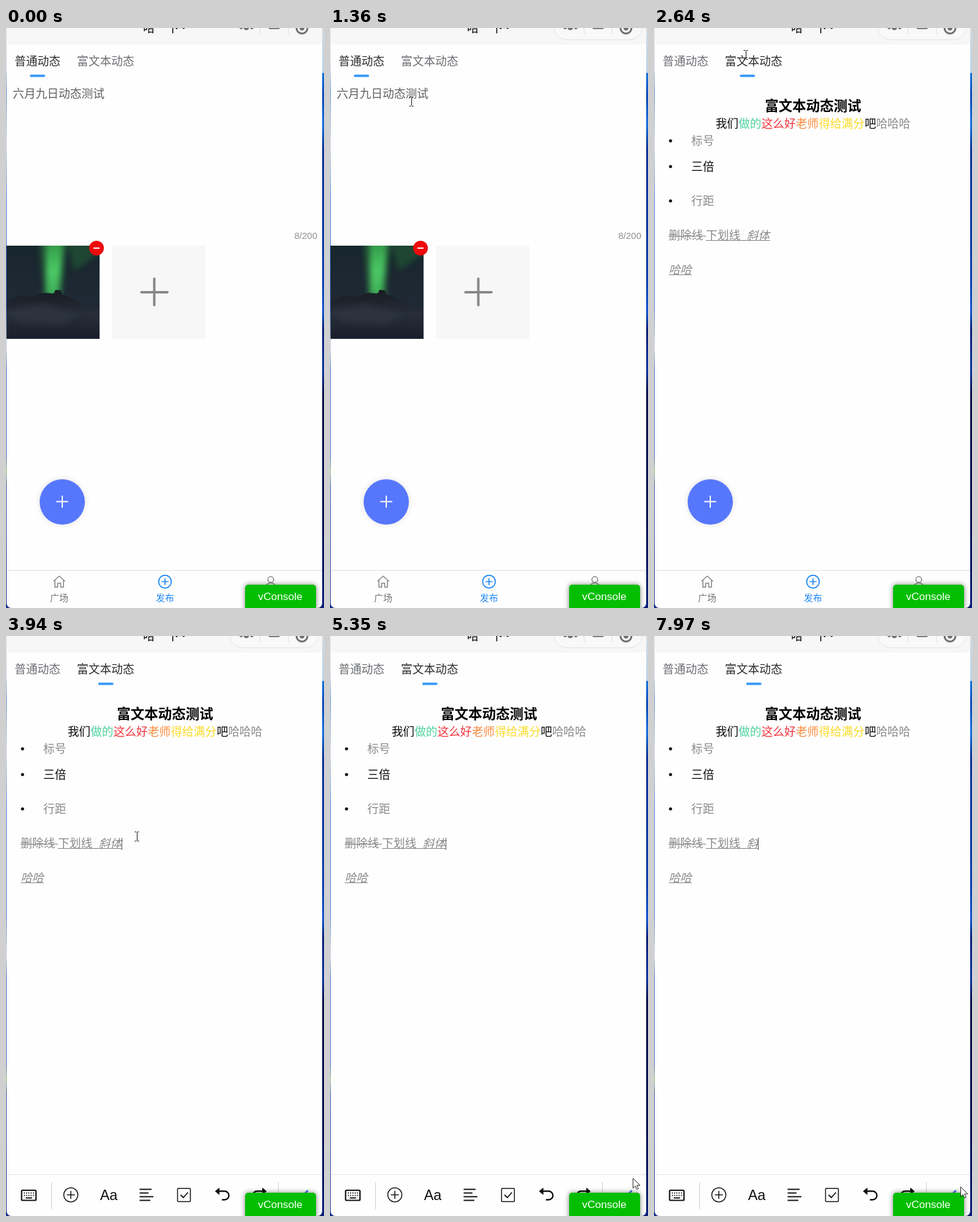
Write an HTML page that moves like this. It is 520 by 946 pixels and loops after 8000 ms.

```html
<!DOCTYPE html>
<html lang="zh">
<head>
<meta charset="utf-8">
<style>
  html, body { margin: 0; width: 100%; height: 100%; overflow: hidden; background: #fff; }
  svg { display: block; width: 520px; height: 946px; }
  text { font: 300 18.75px "Noto Sans CJK SC", "Noto Sans CJK", sans-serif; fill: #606060; white-space: pre; }
  .black { fill: #0a0a0a; }
  .gray { fill: #8a8a8a; }
  .mid { text-anchor: middle; }
  .title { font-size: 22.5px; font-weight: 700; fill: #000; }
  .latin { font-family: "Liberation Sans", Arial, sans-serif; font-weight: 400; }
  .small { font-size: 15px; }
  .slant { font-style: italic; }
  .line { fill: none; stroke-linecap: round; stroke-linejoin: round; }
</style>
</head>
<body>
<svg viewBox="0 0 520 946">
  <defs>
    <linearGradient id="left" x2="0" y2="1">
      <stop offset="0" stop-color="#dcdfe4"/><stop offset=".07" stop-color="#c3d0e4"/>
      <stop offset=".11" stop-color="#4d83cf"/><stop offset=".2" stop-color="#c4ccd8"/>
      <stop offset=".3" stop-color="#2f6fd4"/><stop offset=".48" stop-color="#3b6fd0"/>
      <stop offset=".55" stop-color="#c4ccd8"/><stop offset=".59" stop-color="#3161c4"/>
      <stop offset=".74" stop-color="#3161c4"/><stop offset=".765" stop-color="#9cba6a"/>
      <stop offset=".79" stop-color="#2548a8"/><stop offset="1" stop-color="#162f88"/>
    </linearGradient>
    <linearGradient id="right" x2="0" y2="1">
      <stop offset="0" stop-color="#d3d9e0"/><stop offset=".077" stop-color="#bcd4ea"/>
      <stop offset=".078" stop-color="#1672e0"/><stop offset=".12" stop-color="#0a48b8"/>
      <stop offset=".165" stop-color="#1672e0"/><stop offset=".21" stop-color="#08309c"/>
      <stop offset=".38" stop-color="#0838a8"/><stop offset=".43" stop-color="#0a3cb0"/>
      <stop offset=".49" stop-color="#1254d0"/><stop offset=".52" stop-color="#061c78"/>
      <stop offset=".59" stop-color="#0a34a4"/><stop offset=".63" stop-color="#050f48"/>
      <stop offset=".85" stop-color="#050f50"/><stop offset="1" stop-color="#082078"/>
    </linearGradient>
    <linearGradient id="sky" x2="0" y2="1">
      <stop offset="0" stop-color="#18262d"/><stop offset="1" stop-color="#232b3a"/>
    </linearGradient>
    <linearGradient id="beam" x2="0" y2="1">
      <stop offset="0" stop-color="#2f9443"/><stop offset=".55" stop-color="#4bc865"/>
      <stop offset="1" stop-color="#3fae58"/>
    </linearGradient>
    <linearGradient id="rock" x2="0" y2="1">
      <stop offset="0" stop-color="#171b22"/><stop offset=".5" stop-color="#272e38"/>
      <stop offset="1" stop-color="#191e2a"/>
    </linearGradient>
    <filter id="soft" x="-60%" y="-30%" width="220%" height="160%"><feGaussianBlur stdDeviation="4"/></filter>
    <filter id="shade" x="-20%" y="-40%" width="140%" height="180%"><feGaussianBlur stdDeviation="4"/></filter>
    <clipPath id="photo"><path d="M1 355h152v152H1z"/></clipPath>
  </defs>

  <path fill="url(#left)" d="M0 0h260v946H0z"/>
  <path fill="url(#right)" d="M260 0h260v946H260z"/>
  <path fill="#fefefe" d="M1 0h516v938a8 8 0 0 1-8 8H9a8 8 0 0 1-8-8z"/>

  <!-- header -->
  <path fill="#f7f7f7" d="M1 0h516v27H1z"/>
  <text x="224" y="7" class="black" style="font-size:19.7px;font-weight:400">哈一下~</text>
  <rect id="capsule" x="366" y="-23" width="145" height="42" rx="21" fill="#f9f9f9" stroke="#e2e2e2"/>
  <path stroke="#dcdcdc" d="M415.5 0V10M461.5 0V10"/>
  <g fill="#707070"><circle cx="384.5" cy="-1" r="3"/><circle cx="393" cy="-1" r="4.5"/><circle cx="402" cy="-1" r="3"/></g>
  <path class="line" stroke="#707070" stroke-width="3.5" d="M431 0H446"/>
  <circle cx="484" cy="0" r="9" fill="none" stroke="#707070" stroke-width="3"/><circle cx="484" cy="0" r="4" fill="#707070"/>

  <!-- tabs -->
  <text id="tabA" x="14" y="61">普通动态</text>
  <text id="tabB" x="116" y="61">富文本动态</text>
  <rect id="bar" y="76" width="25" height="4" rx="2" fill="#3f9bfa"/>

  <g id="plain">
    <text x="11" y="114">六月九日动态测试</text>
    <text x="509" y="344" class="latin small" text-anchor="end" style="fill:#909090">8/200</text>
    <g clip-path="url(#photo)">
      <path fill="url(#sky)" d="M1 355h152v152H1z"/>
      <path fill="#245c34" opacity=".6" filter="url(#soft)" d="M98 350H158V364L112 396z"/>
      <path fill="#2b7d40" opacity=".5" filter="url(#soft)" d="M54 345H100L92 440H62z"/>
      <path fill="url(#beam)" filter="url(#soft)" d="M65 345H94L86 436H66z"/>
      <path fill="url(#rock)" d="M1 445L22 437 45 438 62 432 78 433 81 427 90 428 92 434 110 442 130 452 153 458V507H1z"/>
      <path fill="#303743" opacity=".6" filter="url(#soft)" d="M1 462L60 450 120 468 90 484 20 480z"/>
    </g>
    <circle cx="148" cy="359" r="12" fill="#ee0a0a"/>
    <path stroke="#fff" stroke-width="2" d="M143 359H153"/>
    <path fill="#f7f7f7" d="M173 355h153v152H173z"/>
    <path class="line" stroke="#888" stroke-width="4" d="M221.5 431H264M242.5 409V452"/>
  </g>

  <g id="rich">
    <text x="260" y="135" class="title mid">富文本动态测试</text>
    <text x="260" y="163" class="black mid">我们<tspan fill="#4fd3a1">做的</tspan><tspan fill="#f5333c">这么好</tspan><tspan fill="#fa8a3c">老师</tspan><tspan fill="#fadb2a">得给满分</tspan>吧<tspan class="gray">哈哈哈</tspan></text>
    <g><circle cx="27" cy="184" r="2.5"/><circle cx="27" cy="226" r="2.5"/><circle cx="27" cy="282" r="2.5"/></g>
    <text x="61" y="191" class="gray">标号</text>
    <text x="61" y="233" class="black">三倍</text>
    <text x="61" y="289" class="gray">行距</text>
    <text x="24" y="345" class="gray">删除线</text>
    <text x="85" y="345" class="gray">下划线</text>
    <text x="151.5" y="345" class="gray slant">斜<tspan id="lost">体</tspan></text>
    <text x="24" y="401" class="gray slant">哈哈</text>
    <path stroke="#808080" d="M24 339.5H85M24 402.5H62"/>
    <path id="under" stroke="#808080"/>
    <path id="caret" stroke="#555"/>
  </g>

  <g id="nav">
    <circle cx="92" cy="773" r="38" opacity=".1" filter="url(#shade)"/>
    <circle cx="92" cy="773" r="37" fill="#5677fc"/>
    <path class="line" stroke="#fff" stroke-width="2" d="M83 772.5H101M92 763.5V781.5"/>
    <path stroke="#dcdcdc" d="M1 884.5H517"/>
    <g class="line" stroke="#808080" stroke-width="1.5">
      <path d="M78 902L87 894 96 902M80 901V912H84.5V905.5H89.5V912H94V901"/>
      <circle cx="433" cy="899.5" r="4.700"/><path d="M425 912a8 7 0 0 1 16 0"/>
    </g>
    <g class="line" stroke="#1e88f5" stroke-width="1.700">
      <circle cx="260" cy="903" r="10.300"/><path d="M255 903H265M260 898V908"/>
    </g>
    <text x="87" y="935" class="small mid" style="fill:#777">广场</text>
    <text x="260" y="935" class="small mid" style="fill:#1e88f5">发布</text>
  </g>

  <g id="tools">
    <path stroke="#e4e4e4" d="M1 878.5H517"/>
    <path stroke="#ccc" d="M74.5 891V935M445.5 891V935"/>
    <g class="line" stroke="#111" stroke-width="1.8">
      <rect x="25.5" y="904" width="23.5" height="16.500" rx="1.5" stroke-width="2.200"/>
      <path stroke-width="2" stroke-dasharray="0 3.700" d="M30 908.5H46M30 912.5H46"/>
      <path d="M33 916.5H42"/>
      <circle cx="106" cy="911.5" r="11.500" stroke-width="1.5"/>
      <path stroke-width="1.5" d="M100 911.5H112M106 905.5V917.5"/>
      <path stroke-linecap="butt" d="M218.5 902.5H238M218.5 908.5H233M218.5 914.5H241M218.5 920.5H236"/>
      <rect x="280.5" y="901" width="21" height="21.5" rx="1" stroke-width="1.5"/>
      <path d="M286 912L290 916 297 908"/>
      <g id="undo">
        <path stroke-width="2.400" d="M346 905.5H357.500a7 7 0 0 1 0 14H354"/>
        <path fill="#111" stroke-width="1" d="M342.500 905.5L348.500 900.500V910.500z"/>
      </g>
      <use href="#undo" transform="matrix(-1 0 0 1 768 0)"/>
      <path stroke="#4a78e0" stroke-width="3" d="M476 910L482 916 493 905"/>
    </g>
    <text x="168" y="920" class="latin mid" style="font-size:23.5px;fill:#111">Aa</text>
  </g>

  <rect x="391" y="908" width="116" height="44" rx="5" opacity=".5" filter="url(#shade)"/>
  <rect x="391" y="908" width="116" height="44" rx="5" fill="#04be02"/>
  <text x="448.5" y="933" class="latin mid" style="font-size:17.4px;fill:#fff">vConsole</text>

  <g id="cursor">
    <path id="beamCursor" fill="none" stroke="#111" d="M-3.5-7.5H-1L0-6.5 1-7.5H3.5M.5-6V6M-3.5 7.5H-1L0 6.5 1 7.5H3.5"/>
    <path id="arrow" fill="#fff" stroke="#222" stroke-linejoin="round" d="M.5.5V16.5L4.3 13 6.7 18.7 9.2 17.6 6.8 12H12z"/>
  </g>
</svg>
<script>
const LOOP = 8000, SWITCH = 2450, FOCUS = 3680, ERASE = 6590;
const el = id => document.getElementById(id);
const show = (id, on) => el(id).style.display = on ? '' : 'none';

// start, end, then from, control and to points
const moves = [
  [320, 1090, 262, 965, 120, 700, 60, 290],
  [1130, 1350, 60, 290, 75, 165, 133, 120],
  [1390, 1880, 133, 120, 150, 122, 162, 112],
  [2010, 2400, 162, 112, 158, 75, 150, 44],
  [2830, 3630, 150, 44, 225, 140, 214, 327],
  [4570, 5340, 214, 327, 440, 690, 495, 884],
  [5420, 6130, 495, 884, 225, 560, 220, 330],
  [6820, 7600, 220, 330, 430, 700, 494, 884],
  [7830, 7970, 494, 884, 500, 890, 501, 898]
];

function pointer(t) {
  const m = moves.filter(m => m[0] <= t).pop() || moves[0];
  const [a, b, x0, y0, cx, cy, x1, y1] = m;
  const p = Math.min(1, Math.max(0, (t - a) / (b - a)));
  const u = p * p * (3 - 2 * p), v = 1 - u;
  const mix = (f, c, g) => Math.round(v * v * f + 2 * v * u * c + u * u * g);
  return [mix(x0, cx, x1), mix(y0, cy, y1)];
}

const slide = el('bar').animate(
  [{ transform: 'translateX(39px)' }, { transform: 'translateX(150.5px)' }],
  { duration: 300, easing: 'ease', fill: 'both' });
slide.pause();

function draw(t) {
  const rich = t >= SWITCH, editing = t >= FOCUS, end = t < ERASE ? 190 : 171;
  const [x, y] = pointer(t);
  slide.currentTime = Math.min(300, Math.max(0, t - SWITCH));
  el('tabA').style.fill = rich ? '#6c6e72' : '#2c2c2c';
  el('tabB').style.fill = rich ? '#2c2c2c' : '#6c6e72';
  show('capsule', t >= 320);
  show('plain', !rich);
  show('rich', rich);
  show('nav', !editing);
  show('tools', editing);
  show('lost', t < ERASE);
  show('caret', editing);
  el('under').setAttribute('d', `M85 346.5H${end}`);
  el('caret').setAttribute('d', `M${end - .5} 329V349`);
  show('beamCursor', y < 420);
  show('arrow', y >= 420);
  el('cursor').setAttribute('transform', `translate(${x} ${y})`);
}

const start = performance.now();
function tick(now) {
  draw(Math.max(0, now - start) % LOOP);
  requestAnimationFrame(tick);
}
draw(0);
requestAnimationFrame(tick);
</script>
</body>
</html>
```
